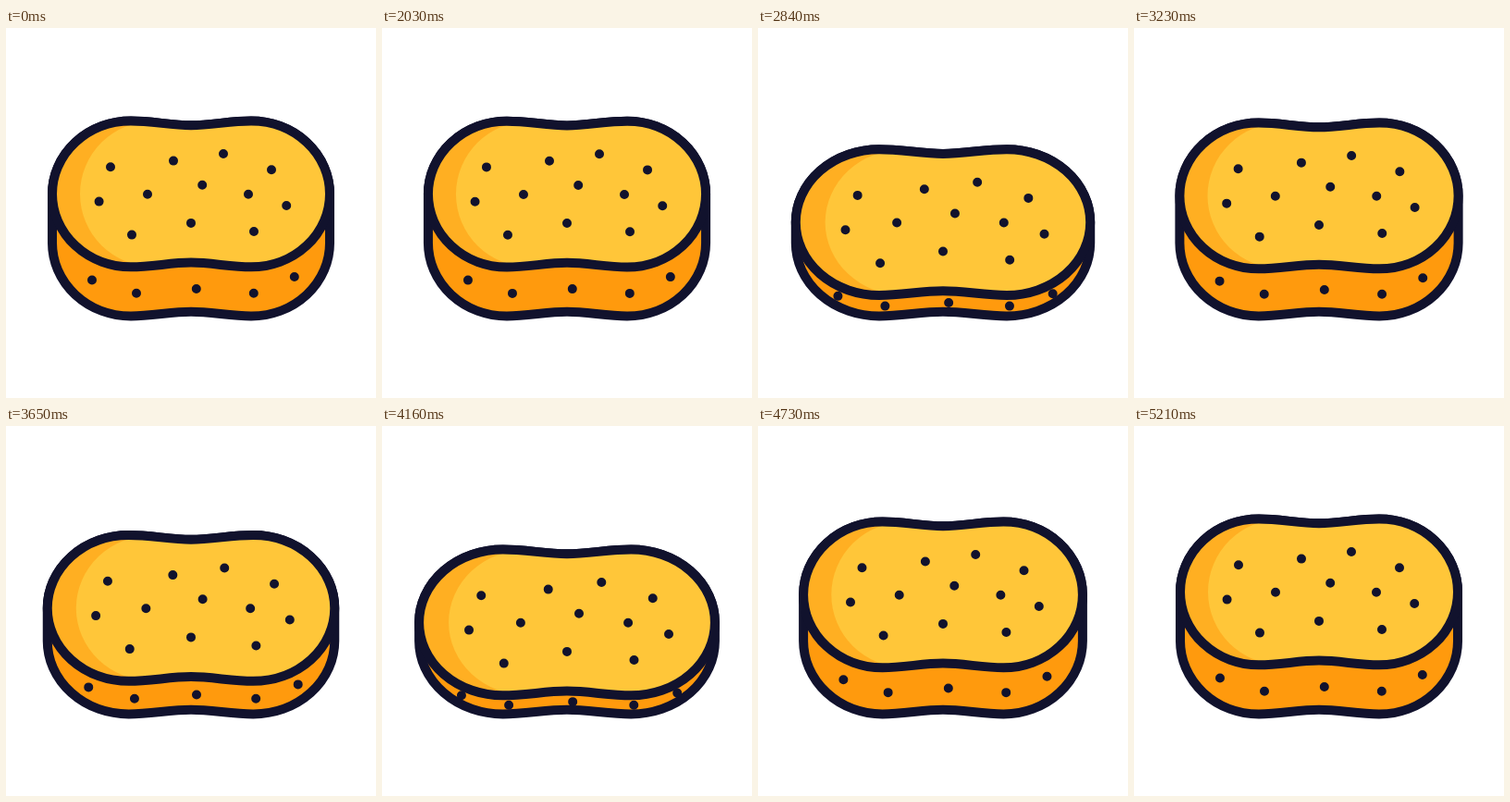
These frames come from a looping animation (400 px wide and 400 px high, 5240 ms). An HTML page with a canvas:

```html
<!DOCTYPE html>
<html>
<head>
<meta charset="utf-8">
<title>Sponge</title>
<style>
html, body { margin: 0; width: 100%; height: 100%; overflow: hidden; background: #fff; }
canvas { display: block; }
</style>
</head>
<body>
<canvas id="stage" width="400" height="400"></canvas>
<script>
const ctx = document.getElementById('stage').getContext('2d');
const LOOP = 5240, STEP = 30, HOLD = 2000;
const INK = '#11122d', SIDE = '#ff9a0d', SHADE = '#ffaf22', FACE = '#ffc639';
const MID = 179.4, RY = 78.9, DIP = 4.7, DEPTH = 53.1, DROP = 35, STRETCH = 0.07;

const faceDots = [[113, 150.2], [181, 143.6], [235, 136], [287, 153.2], [100.6, 187.6],
  [153, 179.8], [212.2, 169.8], [262, 179.8], [303.2, 192], [136, 223.6], [200, 210.9], [268, 220]];
const sideDots = [[93, 272.5], [141, 286.8], [205.8, 282], [267.8, 286.8], [311.8, 269]];

// Squeeze keys in steps: start, end, from, to, easing handles
const keys = [
  [0, 23.5, 0, 1, 1 / 3, 2 / 3],
  [23.5, 44, 1, 0, 1 / 3, 2 / 3],
  [44, 66, 0, 1, 1 / 3, 2 / 3],
  [66, 103, 1, 0, 0.46, 0.24]
];

function ease(x, x1, x2) {
  let lo = 0, hi = 1, s;
  for (let i = 0; i < 30; i++) {
    s = (lo + hi) / 2;
    const r = 1 - s;
    if (3 * s * r * r * x1 + 3 * s * s * r * x2 + s * s * s < x) lo = s; else hi = s;
  }
  return s * s * (3 - 2 * s);
}

function squeeze(n) {
  const key = keys.find(k => n < k[1]);
  if (!key || n <= 0) return 0;
  const [start, end, from, to, x1, x2] = key;
  return from + (to - from) * ease((n - start) / (end - start), x1, x2);
}

// Waisted outline; the sides stretch from the upper centre to the lower one
function outline(sx, upper, lower, left = 50, shoulder = 135) {
  const X = x => 200 + (x - 200) * sx;
  const rx = (shoulder - left) * sx, rr = 85 * sx;
  const top = upper - RY, base = lower + RY, q = Math.PI / 2;
  ctx.beginPath();
  ctx.moveTo(X(shoulder), top);
  ctx.bezierCurveTo(X(Math.max(158, shoulder)), top, X(178), top + DIP, 200, top + DIP);
  ctx.bezierCurveTo(X(222), top + DIP, X(242), top, X(265), top);
  ctx.ellipse(X(265), upper, rr, RY, 0, -q, 0);
  ctx.ellipse(X(265), lower, rr, RY, 0, 0, q);
  ctx.bezierCurveTo(X(242), base, X(222), base - DIP, 200, base - DIP);
  ctx.bezierCurveTo(X(178), base - DIP, X(Math.max(158, shoulder)), base, X(shoulder), base);
  ctx.ellipse(X(shoulder), lower, rx, RY, 0, q, 2 * q);
  ctx.ellipse(X(shoulder), upper, rx, RY, 0, 2 * q, 3 * q);
  ctx.closePath();
}

function fill(color) {
  ctx.fillStyle = color;
  ctx.fill();
}

function dots(list, sx, moveY) {
  ctx.beginPath();
  for (const [x, y] of list) {
    const px = 200 + (x - 200) * sx, py = moveY(y);
    ctx.moveTo(px + 5, py);
    ctx.arc(px, py, 5, 0, 7);
  }
  fill(INK);
}

function draw(p) {
  const sx = 1 + STRETCH * p, y = MID + DROP * p;
  ctx.clearRect(0, 0, 400, 400);
  ctx.lineWidth = 10;
  ctx.lineJoin = 'round';
  ctx.strokeStyle = INK;

  outline(sx, y, MID + DEPTH);
  fill(SIDE);
  ctx.stroke();
  dots(sideDots, sx, v => v + p * 0.283 * (342.5 - v));

  outline(sx, y, y);
  fill(SHADE);
  ctx.save();
  ctx.clip();
  outline(sx, y, y, 80, 160);
  fill(FACE);
  ctx.restore();
  outline(sx, y, y);
  ctx.stroke();
  dots(faceDots, sx, v => v + DROP * p);
}

const begin = performance.now();
function tick() {
  const t = Math.max(0, performance.now() - begin) % LOOP;
  draw(squeeze(Math.floor((t - HOLD) / STEP)));
  requestAnimationFrame(tick);
}
tick();
</script>
</body>
</html>
```
